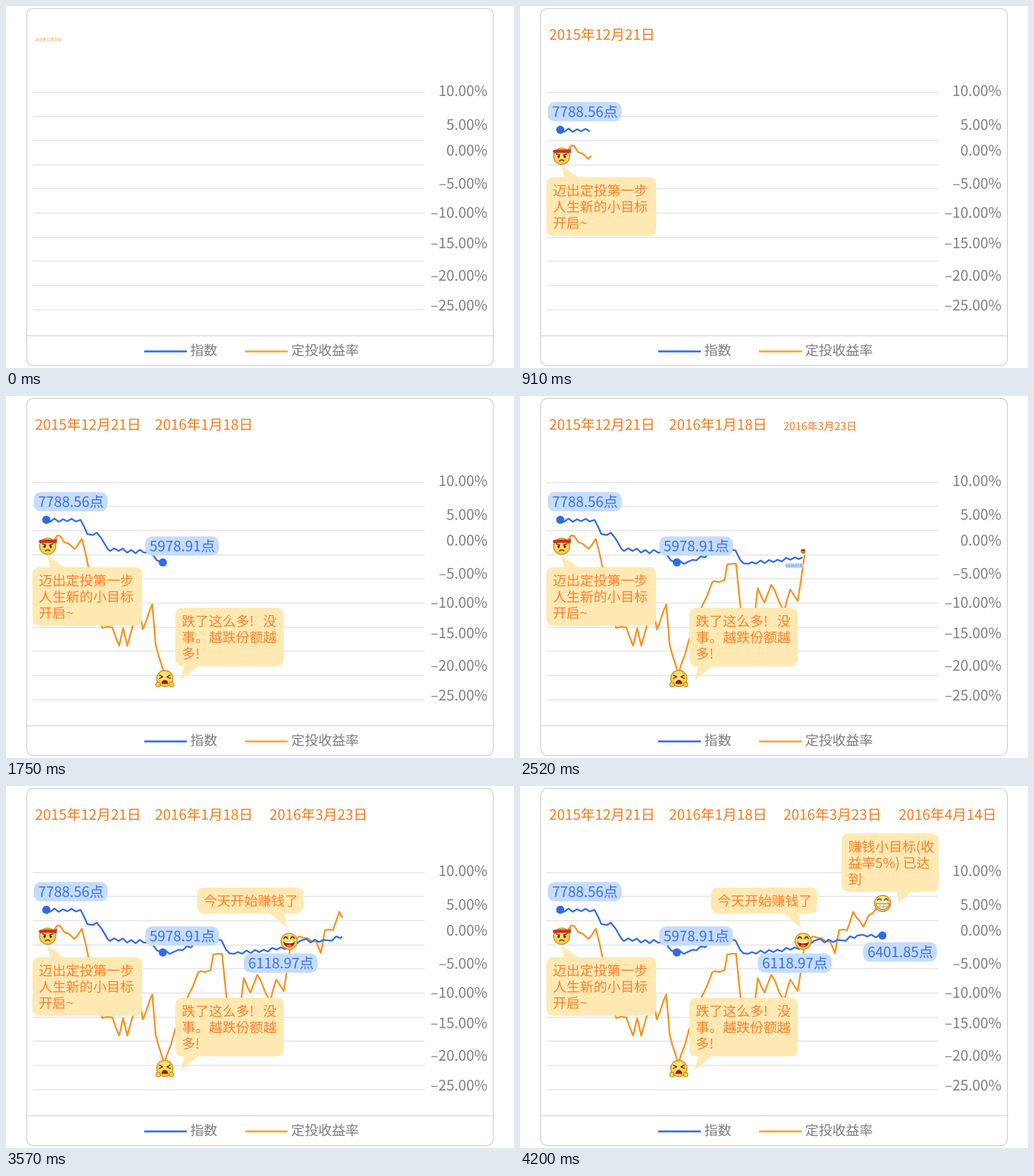
Write a matplotlib script that moves like this. It is 750 by 535 pixels and loops after 4.9 s.

```python
import matplotlib.pyplot as plt
import numpy as np
from matplotlib.animation import FuncAnimation
from matplotlib.patches import Ellipse, FancyBboxPatch, PathPatch, Polygon
from matplotlib.path import Path
from matplotlib.textpath import TextPath
from matplotlib.transforms import Affine2D

W, H, DPI = 750, 535, 100
FRAMES, STEP = 70, 70
PX = 72 / DPI
FONT = {"family": "Noto Sans CJK JP"}

BLUE, ORANGE = "#2f6be3", "#fb9118"
LABEL_BG, LABEL_INK = "#c5dcfc", "#3a70ee"
BUBBLE_BG, BUBBLE_INK = "#ffe9b3", "#ff7f2a"
DATE_INK, GREY = "#fb7a1c", "#7f7f7f"
DARK, RED, SKIN, RIM = "#5a2a10", "#c8321e", "#fbcf48", "#c58a22"

fig = plt.figure(figsize=(W / DPI, H / DPI), dpi=DPI, facecolor="white")
ax = fig.add_axes([0, 0, 1, 1])
ax.set_xlim(0, W)
ax.set_ylim(H, 0)
ax.axis("off")


# Shapes

def text(x, yc, s, size, color, z, right=False):
    """Text whose glyphs are centred on yc, as a scalable path."""
    path = TextPath((0, 0), s, size=size, prop=FONT)
    if right:
        x -= path.get_extents().x1
    flip = Affine2D().scale(1, -1).translate(x, yc + 0.375 * size)
    return ax.add_patch(PathPatch(path.transformed(flip), fc=color, lw=0, zorder=z))


def box(x, y, w, h, r, fc, z, ec="none"):
    style = f"round,pad=0,rounding_size={r}"
    return ax.add_patch(FancyBboxPatch((x, y), w, h, boxstyle=style,
                                       fc=fc, ec=ec, lw=PX, zorder=z))


def oval(x, y, rx, ry, fc, z, ec="none", lw=1):
    return ax.add_patch(Ellipse((x, y), 2 * rx, 2 * ry, fc=fc, ec=ec, lw=lw * PX, zorder=z))


def poly(pts, fc, z):
    return ax.add_patch(Polygon(pts, closed=True, fc=fc, lw=0, zorder=z))


def stroke(pts, color, z, lw=1.4):
    return ax.add_patch(PathPatch(Path(pts), fc="none", ec=color, lw=lw * PX,
                                  capstyle="round", joinstyle="round", zorder=z))


def arc(x, y, rx, ry, a0, a1):
    a = np.radians(np.linspace(a0, a1, 16))
    return np.column_stack([x + rx * np.cos(a), y + ry * np.sin(a)])


def rule(x0, x1, y, color, lw):
    ax.plot([x0, x1], [y, y], color=color, lw=lw * PX, zorder=1)


# Faces

def head(x, y, glow="#ffdf74"):
    return [oval(x, y, 12, 12, SKIN, 6, RIM, 1.3),
            oval(x - 1, y - 3, 8.5, 7, glow, 6)]


def determined(x, y):
    parts = head(x, y)
    parts.append(stroke([(x - 10.5, y - 7), (x, y - 7.5), (x + 11, y - 7)], RED, 7, 5))
    parts.append(poly([(x + 9, y - 8), (x + 14, y - 12), (x + 13, y - 4)], RED, 7))
    for side in (-1, 1):
        parts.append(oval(x + 4.5 * side, y + 0.5, 1.8, 2.1, DARK, 7))
        parts.append(stroke([(x + 8 * side, y - 3.5), (x + 2.5 * side, y - 1.8)], DARK, 7))
    parts.append(stroke(arc(x, y + 8, 3.5, 2.5, 200, 340), DARK, 7))
    return parts


def upset(x, y):
    parts = head(x, y)
    for side in (-1, 1):
        parts.append(stroke([(x + 8 * side, y - 5), (x + 3 * side, y - 2.5),
                             (x + 8 * side, y)], DARK, 7))
        parts.append(oval(x + 10 * side, y + 9, 3.4, 3.4, SKIN, 8, RIM, 1.2))
    parts.append(poly(arc(x, y + 8, 5, 6, 180, 360), "#8e2416", 7))
    return parts


def laughing(x, y):
    parts = head(x, y)
    for side in (-1, 1):
        parts.append(stroke(arc(x + 5 * side, y - 3.5, 2.6, 3, 190, 350), DARK, 7, 1.8))
    parts.append(poly(arc(x, y, 8.5, 9, 0, 180), "#a3201a", 7))
    parts.append(poly(arc(x, y, 8, 3, 0, 180), "white", 7))
    parts.append(oval(x, y + 6.7, 4, 1.8, "#f0684c", 7))
    return parts


def grinning(x, y):
    parts = head(x, y, "#ffedae")
    for side in (-1, 1):
        parts.append(stroke(arc(x + 5 * side, y - 4, 2.8, 2.6, 190, 350), DARK, 7))
    mouth = arc(x, y + 0.5, 9.5, 8.5, 0, 180)
    parts.append(poly(mouth, "white", 7))
    parts.append(stroke(np.vstack([mouth, mouth[:1]]), "#9a6a28", 7, 1))
    for dx in (-4.5, 0, 4.5):
        parts.append(stroke([(x + dx, y + 1), (x + dx, y + 7.5)], "#b89a6a", 7, 0.8))
    parts.append(stroke([(x - 8, y + 4), (x + 8, y + 4)], "#b89a6a", 7, 0.8))
    return parts


# Things that pop in: (parts, anchor, first frame, overshoot)

pops = []


def add_pop(parts, anchor, start, peak):
    pops.append((parts, anchor, start, peak))


def add_date(x, s, start):
    add_pop([text(x, 42, s, 21, DATE_INK, 4)], (x, 52), start, 1.035)


def add_label(x, y, s, anchor, start):
    add_pop([box(x, y, 109, 28.5, 12, LABEL_BG, 4),
             text(x + 6.5, y + 14, s, 21, LABEL_INK, 4)], anchor, start, 1.06)


def add_dot(x, y, start):
    add_pop([oval(x, y, 6, 6, BLUE, 4)], (x, y), start, 1.1)


def add_bubble(x, y, w, lines, tip, root, anchor, start):
    """Bubble with a tail from (root) on its edge to (tip)."""
    h = 38.5 + 24 * (len(lines) - 1)
    rx, ry = root
    parts = [box(x, y, w, h, 11, BUBBLE_BG, 5),
             poly([tip, (rx - 12, ry), (rx + 12, ry)], BUBBLE_BG, 5)]
    parts += [text(x + 9.5, y + 19.5 + 24 * i, s, 20, BUBBLE_INK, 5)
              for i, s in enumerate(lines)]
    add_pop(parts, anchor, start, 1.05)


def add_face(face, x, y, start):
    add_pop(face(x, y), (x, y), start, 1.2)


add_date(43, "2015年12月21日", -1)
add_label(41, 142, "7788.56点", (41, 170), 1)
add_dot(59.5, 183, 1)
add_face(determined, 61.5, 222, 3)
add_bubble(39, 253, 162, ["迈出定投第一步", "人生新的小目标", "开启~"],
           (61, 236), (78, 256), (39, 250), 3)

add_date(220, "2016年1月18日", 17)
add_label(205.5, 207.5, "5978.91点", (236, 238), 18)
add_dot(231.5, 246, 17.5)
add_face(upset, 234.5, 417.5, 17.5)
add_bubble(250, 313, 160, ["跌了这么多!   没", "事。越跌份额越", "多!"],
           (258, 420), (276, 396), (250, 418), 19.7)

add_date(389, "2016年3月23日", 34)
add_label(351, 247.5, "6118.97点", (405, 247), 35)
add_face(laughing, 418, 229.5, 35)
add_bubble(282, 150, 157, ["今天开始赚钱了"],
           (415, 210), (398, 185), (413, 206), 37)

add_date(559, "2016年4月14日", 51.5)
add_label(506.5, 231, "6401.85点", (506, 231), 53)
add_dot(535, 221, 53)
add_face(grinning, 535.5, 173.5, 53)
add_bubble(475, 70, 143, ["赚钱小目标(收", "益率5%) 已达", "到"],
           (559, 173), (568, 154), (541, 161), 54.65)


# Chart frame

box(30.5, 3.5, 689, 528, 11, "white", 0, "#c6c6c6")
rule(30.5, 719.5, 486.5, "#cccccc", 1)
for y in np.linspace(127.5, 448.8, 10):
    rule(40, 617, y, "#e4e4e4", 1.5)
for i, y in enumerate((125, 175, 213, 262, 305, 350, 398, 442)):
    value = 10 - 5 * i
    sign = "–" if value < 0 else ""
    text(710, y, f"{sign}{abs(value):.2f}%", 21.2, GREY, 1, right=True)
for x, color, name in ((205, "#3f7ae8", "指数"), (354, "#ffab38", "定投收益率")):
    rule(x, x + 60, 510, color, 3)
    text(x + 67, 508.5, name, 20, GREY, 1)


# Curves: a trend through key points with small daily swings between them

def daily(keys, swing, seed):
    kx, ky = np.array(keys).T
    days = np.arange(kx[0], kx[-1], 6.3)
    days = days[np.abs(days[:, None] - kx).min(axis=1) > 3]
    rng = np.random.default_rng(seed)
    noise = swing * rng.uniform(0.2, 1, days.size) * (-1) ** np.arange(days.size)
    x = np.append(kx, days)
    y = np.append(ky, np.interp(days, kx, ky) + noise)
    order = x.argsort()
    return x[order], y[order]


index = daily([(59, 183), (110, 183), (120, 204), (134, 202), (150, 226), (208, 231),
               (231, 246), (246, 246), (284, 233), (318, 228), (325, 242), (337, 248),
               (416, 239), (434, 229), (474, 228), (498, 221), (535, 221)], 3, 4)
yields = daily([(61, 222), (76, 206), (101, 226), (112, 211), (142, 343), (157, 342),
                (167, 369), (173, 343), (179, 369), (196, 310), (202, 345), (216, 308),
                (221, 368), (234, 411), (249, 362), (284, 275), (302, 272), (306, 249),
                (319, 248), (326, 318), (347, 318), (351, 284), (361, 305), (371, 279),
                (390, 318), (399, 286), (410, 303), (420, 236), (433, 222), (458, 230),
                (465, 247), (471, 213), (483, 213), (492, 186), (507, 208), (515, 191),
                (535, 173)], 2.5, 7)


def curve(pts, color, z, stops):
    line, = ax.plot([], [], color=color, lw=2.4 * PX, zorder=z, solid_joinstyle="round")
    return line, pts, stops


curves = [curve(index, BLUE, 3, (59, 231, 416, 535)),
          curve(yields, ORANGE, 2, (61, 234, 420, 535))]


def reveal(line, pts, stops, n):
    """Draw the curve from left to right in three runs, resting between them."""
    a, b, c, d = stops
    x = np.interp(n, [11, 19, 28, 36, 45, 54], [a, b, b, c, c, d])
    xs, ys = pts
    seen = xs < x
    line.set_data(np.append(xs[seen], x), np.append(ys[seen], np.interp(x, xs, ys)))
    line.set_visible(n > 11)


def pop_scale(t, peak):
    return np.interp(t, range(6), [0, 0.25, 0.75, peak, (1 + peak) / 2, 1])


def draw(n):
    for line, pts, stops in curves:
        reveal(line, pts, stops, n)
    for parts, (x, y), start, peak in pops:
        s = pop_scale(n - start, peak)
        grow = Affine2D().translate(-x, -y).scale(max(s, 0.01)).translate(x, y)
        for p in parts:
            p.set_transform(grow + ax.transData)
            p.set_visible(s > 0.02)
    return []


anim = FuncAnimation(fig, draw, frames=FRAMES, interval=STEP, repeat=True,
                     repeat_delay=0, blit=False)
plt.show()
```
